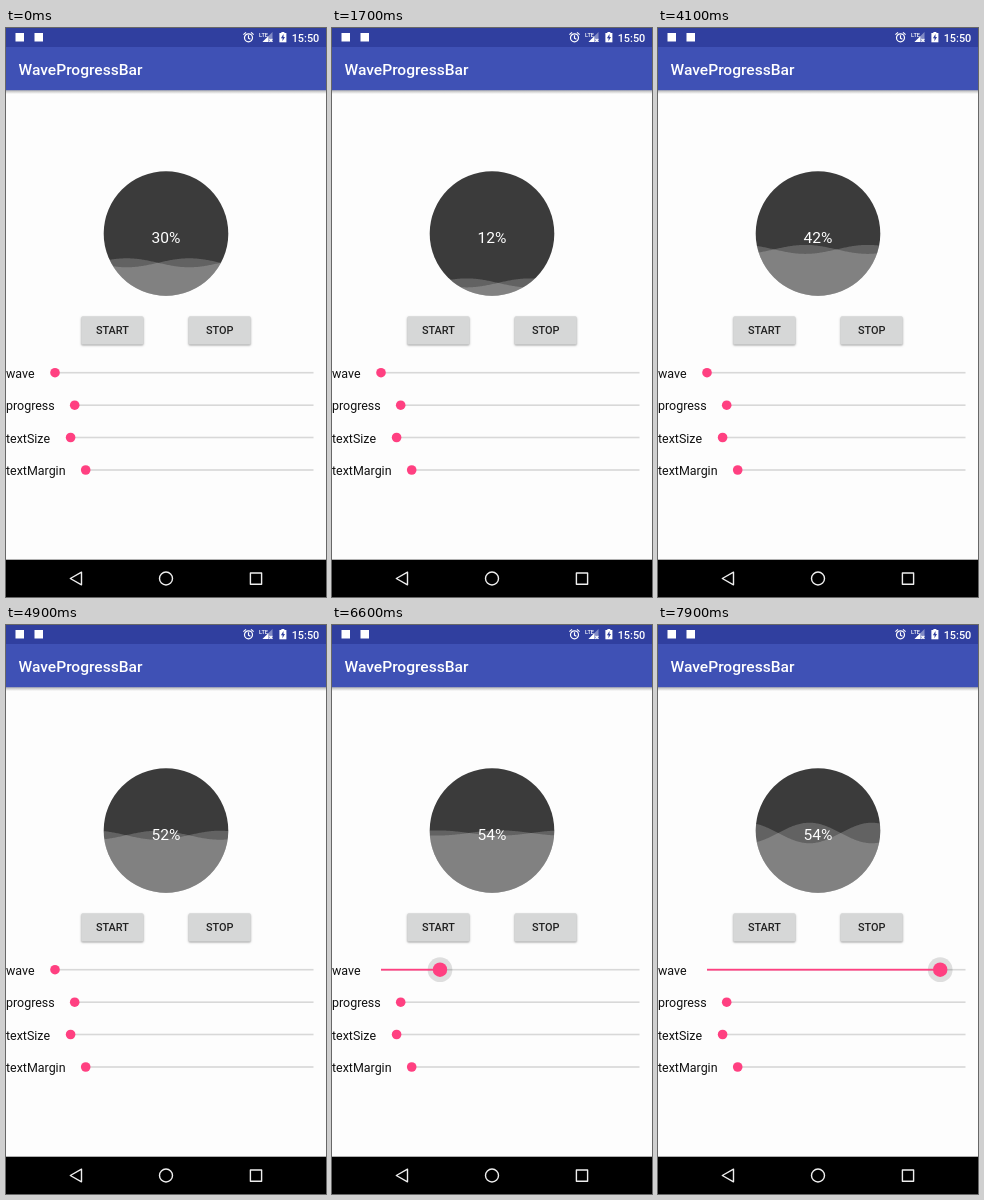
Animation of 320 by 569 pixels, one loop 8 s. Source, as an HTML page with a canvas:

```html
<!DOCTYPE html>
<html lang="en">
<head>
<meta charset="utf-8">
<title>WaveProgressBar</title>
<style>
  html, body { margin: 0; width: 100%; height: 100%; overflow: hidden; background: #fdfdfd; }
  canvas { display: block; width: 320px; height: 569px; }
</style>
</head>
<body>
<canvas id="stage"></canvas>
<script>
const W = 320, H = 569, LOOP = 8000, TICK = 100;
const ACCENT = '#ff4081';
const DIAL = { x: 160, y: 205.5, r: 62.3 };
const WAVELENGTH = 125;
const TRACK_END = 307.5;
const SLIDERS = [
  { label: 'wave', x: 49, y: 344.7 },
  { label: 'progress', x: 68.7, y: 377.2 },
  { label: 'textSize', x: 64.6, y: 409.5 },
  { label: 'textMargin', x: 79.7, y: 442 }
];

const canvas = document.getElementById('stage');
const ctx = canvas.getContext('2d');
const dpr = window.devicePixelRatio || 1;
canvas.width = W * dpr;
canvas.height = H * dpr;
ctx.scale(dpr, dpr);

function rect(x, y, w, h, fill) {
  ctx.fillStyle = fill;
  ctx.fillRect(x, y, w, h);
}

function disc(x, y, r, fill) {
  ctx.beginPath();
  ctx.arc(x, y, r, 0, Math.PI * 2);
  ctx.fillStyle = fill;
  ctx.fill();
}

function poly(points) {
  ctx.beginPath();
  points.forEach(([x, y]) => ctx.lineTo(x, y));
  ctx.closePath();
}

function text(str, x, y, size, color, weight = 400, align = 'left') {
  ctx.font = `${weight} ${size}px Roboto, sans-serif`;
  ctx.textAlign = align;
  ctx.fillStyle = color;
  ctx.fillText(str, x, y);
}

function stateAt(t) {
  const started = t >= 800;
  const runTime = Math.min(t, 5100) - 1700;
  const dragging = t >= 6250;
  const thumb = dragging ? 108 + (t - 6600) * 0.134 : SLIDERS[0].x;
  const share = (thumb - SLIDERS[0].x) / (TRACK_END - SLIDERS[0].x);
  return {
    percent: started ? Math.floor(12.2 + runTime * 0.0125) : 30,
    crossing: started ? 166 + (t - 1700) * WAVELENGTH / 1500 : 152,
    amp: dragging ? share * 11.4 : 4.5,
    thumb,
    dragging,
    startDown: t >= 500 && t < 900,
    stopDown: t >= 5000 && t < 5200
  };
}

function drawStatusBar() {
  rect(0, 0, W, 19, '#303f9f');
  rect(9.5, 5, 8.5, 8.5, '#fff');
  rect(28.5, 5, 8.5, 8.5, '#fff');

  // alarm clock
  ctx.strokeStyle = '#fff';
  ctx.lineWidth = 1.2;
  ctx.beginPath();
  ctx.arc(242.5, 9.8, 4, 0, Math.PI * 2);
  ctx.moveTo(242.5, 7.2);
  ctx.lineTo(242.5, 10.2);
  ctx.lineTo(244.4, 11.3);
  ctx.moveTo(237.4, 6.6);
  ctx.lineTo(240, 4.4);
  ctx.moveTo(245, 4.4);
  ctx.lineTo(247.6, 6.6);
  ctx.stroke();

  // signal
  text('LTE', 253, 8.7, 5.6, '#fff', 500);
  ctx.fillStyle = 'rgba(255,255,255,.4)';
  poly([[266.5, 4], [266.5, 14], [256.5, 14]]);
  ctx.fill();
  ctx.fillStyle = '#fff';
  poly([[262.3, 8.2], [262.3, 14], [256.5, 14]]);
  ctx.fill();
  ctx.beginPath();
  ctx.moveTo(263.4, 10.8);
  ctx.lineTo(266.4, 13.8);
  ctx.moveTo(266.4, 10.8);
  ctx.lineTo(263.4, 13.8);
  ctx.stroke();

  // charging battery
  rect(275.4, 4, 3, 1.4, '#fff');
  rect(273.4, 5, 7, 9.3, '#fff');
  ctx.fillStyle = '#303f9f';
  poly([[277.5, 6], [274.9, 10.3], [276.6, 10.3], [276.4, 13.2], [279, 8.9], [277.5, 8.9]]);
  ctx.fill();

  text('15:50', 313.3, 13.6, 10.9, '#fff', 500, 'right');
}

function drawToolbar() {
  const shade = ctx.createLinearGradient(0, 62, 0, 66);
  shade.addColorStop(0, 'rgba(0,0,0,.3)');
  shade.addColorStop(1, 'rgba(0,0,0,0)');
  rect(0, 62, W, 4, shade);
  rect(0, 18.7, W, 43.5, '#3f51b5');
  text('WaveProgressBar', 12.5, 46.6, 15.56, '#fff', 500);
}

function drawWave(level, amp, crossing, sign) {
  const left = DIAL.x - DIAL.r, right = DIAL.x + DIAL.r;
  ctx.beginPath();
  ctx.moveTo(left, DIAL.y + DIAL.r);
  for (let x = left; x <= right + 1; x++) {
    ctx.lineTo(x, level + sign * amp * Math.sin((x - crossing) * 2 * Math.PI / WAVELENGTH));
  }
  ctx.lineTo(right + 1, DIAL.y + DIAL.r);
  ctx.fillStyle = 'rgba(255,255,255,.2)';
  ctx.fill();
}

function drawDial(s) {
  const level = 268.3 - s.percent * 1.117;
  disc(DIAL.x, DIAL.y, DIAL.r, '#3b3b3b');
  ctx.save();
  ctx.beginPath();
  ctx.arc(DIAL.x, DIAL.y, DIAL.r, 0, Math.PI * 2);
  ctx.clip();
  drawWave(level, s.amp, s.crossing, 1);
  drawWave(level, s.amp, s.crossing, -1);
  ctx.restore();
  text(s.percent + '%', DIAL.x, 215, 15.56, '#fff', 400, 'center');
}

function drawButton(label, x, down) {
  ctx.save();
  ctx.shadowColor = 'rgba(0,0,0,.35)';
  ctx.shadowBlur = (down ? 4 : 2) * dpr;
  ctx.shadowOffsetY = (down ? 2 : 1) * dpr;
  ctx.beginPath();
  ctx.roundRect(x, 288.3, 62.3, 28.2, 1.5);
  ctx.fillStyle = down ? '#c8c9c9' : '#d6d7d7';
  ctx.fill();
  ctx.restore();
  text(label, x + 31.2, 306.4, 10.9, '#212121', 500, 'center');
}

function drawSlider({ label, x, y }, thumb, active) {
  text(label, 0, y + 5, 12.45, '#111');
  rect(x, y - 0.8, TRACK_END - x, 1.6, '#d8d8d8');
  if (active) {
    disc(thumb, y, 12.4, 'rgba(0,0,0,.12)');
    rect(x, y - 0.9, thumb - x, 1.8, ACCENT);
  }
  disc(thumb, y, active ? 7.2 : 4.8, ACCENT);
}

function drawNavBar() {
  rect(0, 531.7, W, H - 531.7, '#000');
  ctx.strokeStyle = '#eee';
  ctx.lineWidth = 1.4;
  ctx.lineJoin = 'round';
  poly([[64.3, 550.5], [75.5, 544.2], [75.5, 556.8]]);
  ctx.stroke();
  ctx.beginPath();
  ctx.arc(160, 550.5, 6.5, 0, Math.PI * 2);
  ctx.stroke();
  ctx.strokeRect(244.4, 545, 11.2, 11.2);
}

function draw(t) {
  const s = stateAt(t);
  rect(0, 0, W, H, '#fdfdfd');
  drawToolbar();
  drawStatusBar();
  drawDial(s);
  drawButton('START', 75.2, s.startDown);
  drawButton('STOP', 182.5, s.stopDown);
  SLIDERS.forEach((slider, i) => {
    const active = i === 0 && s.dragging;
    drawSlider(slider, active ? s.thumb : slider.x, active);
  });
  drawNavBar();
}

const begin = performance.now();
function frame() {
  const t = (performance.now() - begin) % LOOP;
  draw(Math.floor(t / TICK) * TICK);
  requestAnimationFrame(frame);
}
frame();
</script>
</body>
</html>
```
